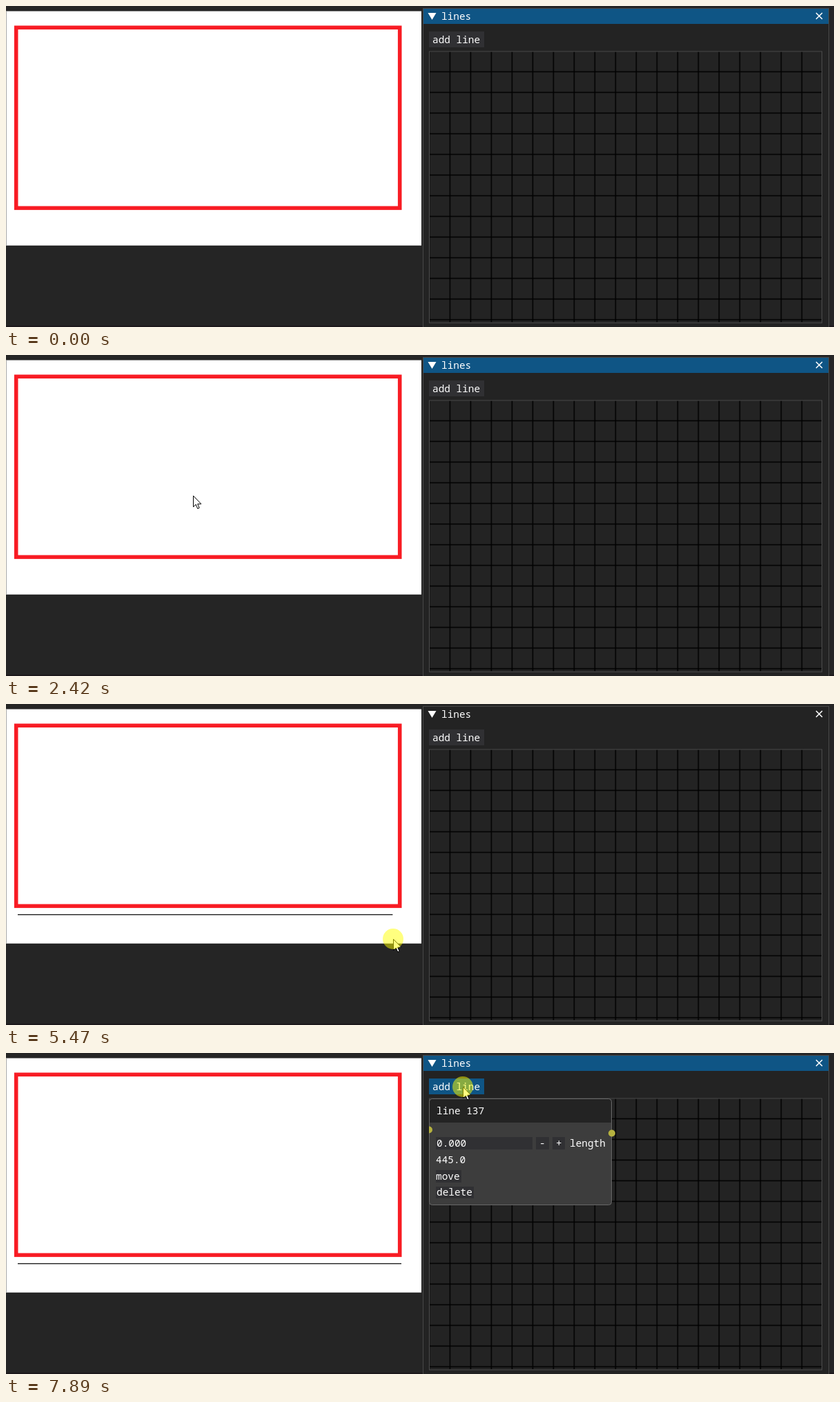
An HTML page that plays this animation: 1200 px wide and 466 px high, repeating every 7.99 s.

```html
<!DOCTYPE html>
<html lang="en">
<head>
<meta charset="utf-8">
<title>lines</title>
<style>
  html, body { margin: 0; width: 100%; height: 100%; overflow: hidden; background: #252525; }
  svg { display: block; }
  text { font: 14.4px "Noto Sans Mono", "DejaVu Sans Mono", monospace; fill: #fff; white-space: pre; }
  .field { fill: #303033; }
</style>
</head>
<body>
<svg width="1200" height="466" viewBox="0 0 1200 466">
  <defs>
    <pattern id="grid" x="614.25" y="66.25" width="30" height="30" patternUnits="userSpaceOnUse">
      <path d="M30 0V30H0" fill="none" stroke="#000" stroke-width="3"/>
    </pattern>
    <clipPath id="editor"><rect x="613" y="65" width="570" height="396"/></clipPath>
  </defs>

  <rect y="464" width="1200" height="2" fill="#1d191c"/>

  <!-- drawing board -->
  <rect y="7.5" width="602" height="340.2" fill="#fff"/>
  <path d="M.5 8V348" stroke="#aaa"/>
  <rect x="14.7" y="31.3" width="556" height="262" fill="none" stroke="#f81c24" stroke-width="5.6"/>
  <path id="line" stroke="#303030" stroke-width="1.5"/>

  <!-- lines window -->
  <rect x="604.5" y="3.5" width="588" height="470" fill="#232323" stroke="#484848"/>
  <rect id="title" x="605" y="4" width="587" height="22"/>
  <path d="M611.5 10H623.5L617.5 20Z" fill="#fff"/>
  <text x="631" y="20">lines</text>
  <path d="M1174 10L1183 19M1183 10L1174 19" stroke="#fff" stroke-width="1.5"/>
  <rect id="button" x="613" y="37" width="80" height="23"/>
  <text x="618" y="54">add line</text>
  <rect x="613.5" y="66" width="569" height="393" fill="url(#grid)"/>
  <rect x="613.5" y="66" width="569" height="394" fill="none" stroke="#4c4c4c"/>

  <g id="node" clip-path="url(#editor)">
    <rect x="613.5" y="66.5" width="264" height="154" rx="4" fill="#3d3d3d"/>
    <path d="M614 101V70Q614 67 617 67H874Q877 67 877 70V101Z" fill="#232323"/>
    <rect x="613.5" y="66.5" width="264" height="154" rx="4" fill="none" stroke="#686868"/>
    <g fill="#b5b13f"><circle cx="613" cy="111.5" r="5"/><circle cx="878" cy="116.5" r="5"/></g>
    <g class="field">
      <rect x="623" y="122" width="140" height="18"/>
      <rect x="768" y="122" width="19" height="18"/>
      <rect x="792" y="122" width="18" height="18"/>
      <rect x="623" y="170" width="37" height="18"/>
      <rect x="623" y="194" width="55" height="17"/>
    </g>
    <text x="624" y="89">line 137</text>
    <text x="624" y="136">0.000</text>
    <text x="773" y="136">-</text>
    <text x="797" y="136">+</text>
    <text x="817" y="136">length</text>
    <text x="623" y="160">445.0</text>
    <text x="623" y="184">move</text>
    <text x="624" y="207">delete</text>
  </g>

  <g id="cursor">
    <path d="M.5.5V16.5L4.2 13L6.7 19L9.2 18L6.7 12.2H11.8Z" fill="#fff" stroke="#000"/>
    <circle id="press" r="15" fill="#ff0" fill-opacity=".5"/>
  </g>
</svg>
<script>
const LOOP = 7990, STEP = 100, LINE_LAG = 16;
const PRESS = 4350, RELEASE = 6570, REFOCUS = 7890;
const $ = id => document.getElementById(id);
const [line, title, button, node, cursor, press] =
  ['line', 'title', 'button', 'node', 'cursor', 'press'].map($);

// each stroke carries the pointer on from where the last one ended
const entry = { x: 1156, y: 497 };
const strokes = [
  { from: 100, to: 1100, x: 658, y: 50 },             // to the button
  { from: 1920, to: 2820, x: 17, y: 305 },            // to the line start
  { from: PRESS, to: 5530, x: 563, y: 341, bow: -15 }, // drag
  { from: 5770, to: 6370, x: 573, y: 341 },           // settle
  { from: 6470, to: 7070, x: 633, y: 35 },            // back to the window
  { from: 7070, to: 7690, x: 662, y: 49 }             // onto the button
];

const clamp = v => Math.min(1, Math.max(0, v));
const ease = s => s ** 3 * (10 - 15 * s + 6 * s * s);
const within = (t, from, to) => t >= from && t < to;
const show = (el, on) => el.setAttribute('visibility', on ? 'visible' : 'hidden');

// the pointer is sampled in steps counted from the start of each stroke
function heldTime(t) {
  const { from } = strokes.findLast(s => t >= s.from) || strokes[0];
  return from + Math.floor((t - from) / STEP) * STEP;
}

function pointerAt(t) {
  let { x, y } = entry;
  for (const s of strokes) {
    const p = ease(clamp((t - s.from) / (s.to - s.from)));
    x += (s.x - x) * p;
    y += (s.y - y) * p + (s.bow || 0) * 4 * p * (1 - p);
  }
  return { x, y };
}

function draw(t) {
  const held = heldTime(t);
  const { x, y } = pointerAt(held);
  const clicking = within(t, 1500, 1700) || t >= REFOCUS;
  const hovering = within(t, 1700, 2020) || t >= 7170;

  cursor.setAttribute('transform', `translate(${Math.round(x)} ${Math.round(y)})`);
  show(cursor, t >= 400);
  press.setAttribute('r', clicking || within(t, PRESS, RELEASE) ? 15 : 0);

  const end = pointerAt(Math.min(held, 6470) - LINE_LAG).x;
  line.setAttribute('d', t >= PRESS ? `M17 305.7H${end.toFixed(1)}` : '');
  title.setAttribute('fill', within(t, PRESS, REFOCUS) ? '#232323' : '#0f5585');
  button.setAttribute('fill', clicking ? '#0f5585' : hovering ? '#245378' : '#303033');
  show(node, t >= RELEASE);
}

const start = performance.now();
function tick() {
  draw((performance.now() - start) % LOOP);
  requestAnimationFrame(tick);
}
tick();
</script>
</body>
</html>
```
